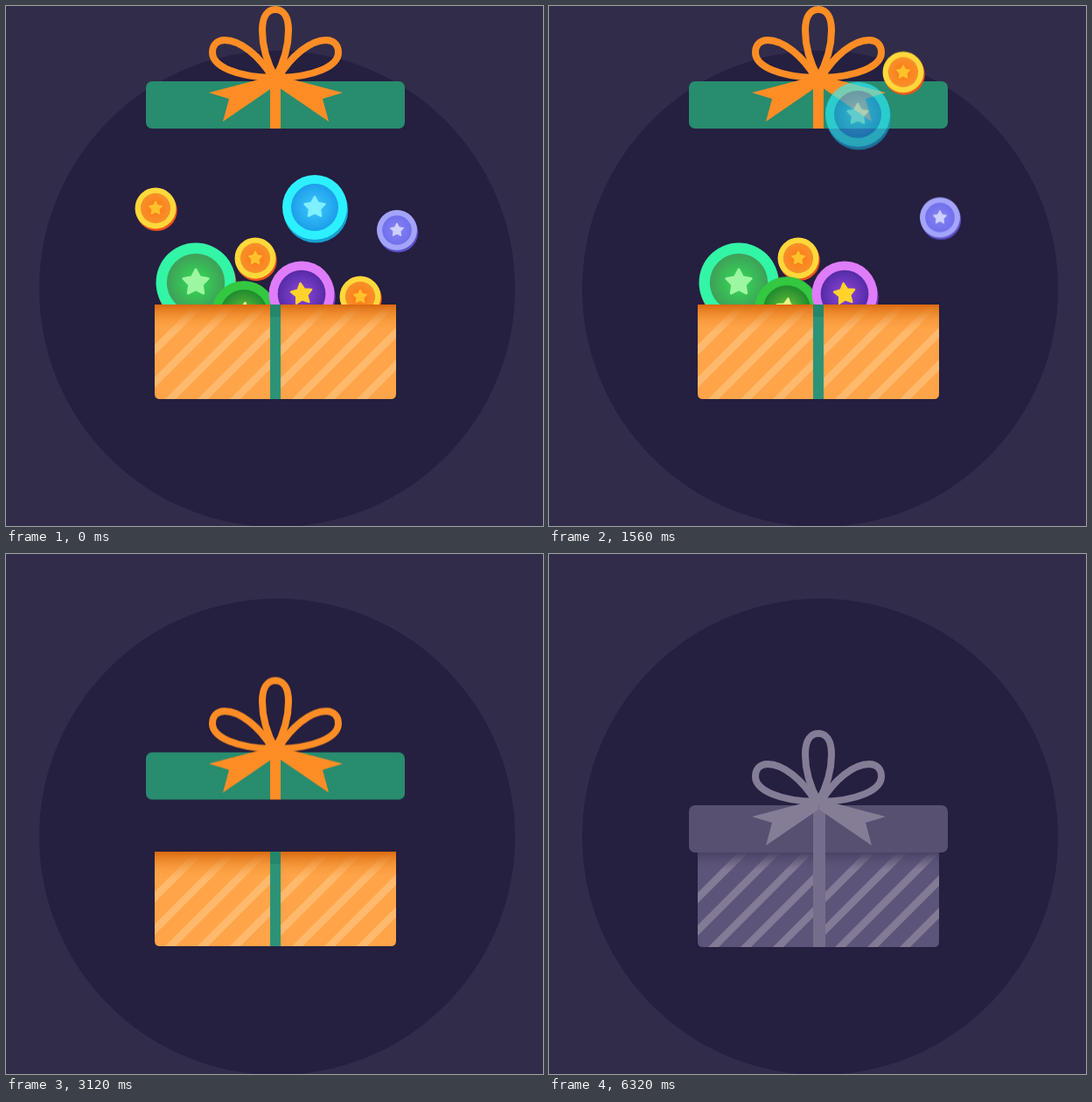
Animation of 614 by 594 pixels, one loop 9240 ms. Source, as an HTML page:

```html
<!DOCTYPE html>
<html lang="en">
<head>
<meta charset="utf-8">
<title>Gift box</title>
<style>
  html, body { margin: 0; width: 100%; height: 100%; overflow: hidden; background: #312c49; }
  svg { display: block; width: 614px; height: 594px; }
  .lid, .box, .color, .grey, .rise, .fade { animation: 9240ms linear infinite both; }
</style>
</head>
<body>
<svg viewBox="0 0 614 594">
  <defs>
    <linearGradient id="shadow" x1="0" y1="0" x2="0" y2="1">
      <stop offset="0" stop-color="#d9680f"/>
      <stop offset=".4" stop-color="#e88324" stop-opacity=".6"/>
      <stop offset="1" stop-color="#ffa448" stop-opacity="0"/>
    </linearGradient>
    <linearGradient id="greyShadow" x1="0" y1="0" x2="0" y2="1">
      <stop offset="0" stop-color="#494263"/>
      <stop offset="1" stop-color="#5d5479" stop-opacity="0"/>
    </linearGradient>
    <clipPath id="panels"><path d="M170 341H302V449H176Q170 449 170 443ZM314 341H446V443Q446 449 440 449H314Z"/></clipPath>
    <path id="body" d="M170 341H446V443Q446 449 440 449H176Q170 449 170 443Z"/>
    <g id="stripes" clip-path="url(#panels)" fill="none" stroke-width="8.5"></g>
    <g id="bow">
      <g fill="none" stroke="currentColor" stroke-width="8" stroke-linejoin="round">
        <path d="M308 82C297 62 293 44 293 28C293 12 299 4 308 4C317 4 323 12 323 28C323 44 319 62 308 82Z"/>
        <path id="loop" d="M305 82C290 57 268 39 250 39C240 39 236 46 236 53C236 69 264 81 305 82Z"/>
        <use href="#loop" transform="matrix(-1 0 0 1 616 0)"/>
      </g>
      <path id="tail" fill="currentColor" d="M308 79L232 99L255 106L248 132L308 91Z"/>
      <use href="#tail" transform="matrix(-1 0 0 1 617 0)"/>
    </g>
  </defs>

  <circle cx="310" cy="323" r="272" fill="#251f40"/>

  <g class="color">
    <g class="lid" color="#ff8d25">
      <rect x="160" y="86" width="296" height="54" rx="7" fill="#288c6e"/>
      <rect x="302" y="84" width="12" height="56" fill="currentColor"/>
      <use href="#bow"/>
    </g>
    <g id="coins"></g>
    <g class="box">
      <use href="#body" fill="#ffa448"/>
      <use href="#stripes" stroke="#ffb96d"/>
      <rect x="302" y="341" width="12" height="108" fill="#2d9376"/>
      <rect x="170" y="341" width="132" height="32" fill="url(#shadow)"/>
      <rect x="314" y="341" width="132" height="32" fill="url(#shadow)"/>
      <rect x="302" y="341" width="12" height="14" fill="#1d7a5e" opacity=".5"/>
    </g>
  </g>

  <g class="grey" color="#857d96">
    <use href="#body" fill="#5d5479"/>
    <use href="#stripes" stroke="#837a95"/>
    <rect x="170" y="341" width="276" height="20" fill="url(#greyShadow)"/>
    <rect x="160" y="287" width="296" height="54" rx="7" fill="#575070"/>
    <rect x="302" y="286" width="14" height="163" fill="#756d89"/>
    <use href="#bow" y="201"/>
  </g>
</svg>

<script>
const LOOP = 9240;
const NS = "http://www.w3.org/2000/svg";
const pct = ms => (ms / LOOP * 100).toFixed(3) + "%";
const rules = [];

function keyframes(name, from, to, start, end, ease = "linear") {
  rules.push(`@keyframes ${name} {
    0% { ${from} }
    ${pct(start)} { ${from}; animation-timing-function: ${ease} }
    ${pct(end)}, 100% { ${to} }
  }`);
}

function add(parent, tag, attrs) {
  const el = document.createElementNS(NS, tag);
  for (const key in attrs) el.setAttribute(key, attrs[key]);
  return parent.appendChild(el);
}

const shift = y => `transform: translateY(${y}px)`;
const alpha = a => `opacity: ${a}`;

function bind(selector, name) {
  rules.push(`${selector} { animation-name: ${name} }`);
}

// Diagonal stripes, the same on both panels
const stripes = document.getElementById("stripes");
for (const [left, base] of [[170, 563], [314, 708]]) {
  for (let i = 0; i < 5; i++) {
    const sum = base + i * 37;
    const x1 = Math.max(left, sum - 449), x2 = Math.min(left + 132, sum - 341);
    const a = Math.max(left - 8, x1 - 8), b = Math.min(left + 140, x2 + 8);
    add(stripes, "path", { d: `M${a} ${sum - a}L${b} ${sum - b}` });
  }
}

// ring, rim of the disc, centre of the disc, star, side
const skins = {
  gold:   ["#ffd83a", "#f6912a", "#ff7f1c", "#ffc22c", "#ee541b"],
  cyan:   ["#2df0ff", "#1c9eea", "#34bdf8", "#80f0ff", "#189fd0"],
  blue:   ["#a3a4fa", "#7170ec", "#7f7df2", "#ced0ff", "#5b50c8"],
  mint:   ["#33f5a6", "#3f9f58", "#36cc57", "#9df7a0", "#d8481f"],
  green:  ["#33c83f", "#1f8a2f", "#55b236", "#e6fb86", "#14602a"],
  purple: ["#df7cfa", "#552ba6", "#7d3fca", "#ffd32b", "#7939bd"]
};

for (const name in skins) {
  const g = add(document.querySelector("defs"), "radialGradient", { id: name });
  add(g, "stop", { offset: .3, "stop-color": skins[name][2] });
  add(g, "stop", { offset: 1, "stop-color": skins[name][1] });
}

function starPath(r, tilt) {
  const pts = [];
  for (let i = 0; i < 10; i++) {
    const a = i * Math.PI / 5 - Math.PI / 2 + tilt;
    const d = i % 2 ? r * .52 : r;
    pts.push((d * Math.cos(a)).toFixed(2) + "," + (d * Math.sin(a)).toFixed(2));
  }
  return pts.join(" ");
}

// rise and fade: start and end in ms
const coins = [
  { skin: "gold",   x: 171, y: 231, r: 23.5, up: 80,  rise: [160, 1790],  fade: [800, 1520] },
  { skin: "cyan",   x: 353, y: 230, r: 37,   up: 115, rise: [930, 1880],  fade: [1400, 1860] },
  { skin: "gold",   x: 405, y: 332, r: 23.5, up: 330, rise: [800, 2400],  fade: [1720, 2420] },
  { skin: "blue",   x: 447, y: 256, r: 23,   up: 120, rise: [1372, 3006], fade: [2000, 2840] },
  { skin: "mint",   x: 217, y: 316, r: 45.5, up: 0,   rise: [1700, 2400], fade: [1720, 2380] },
  { skin: "gold",   x: 285, y: 288, r: 23.5, up: 115, rise: [1750, 2650], fade: [2200, 2640] },
  { skin: "green",  x: 272, y: 351, r: 37,   up: 110, rise: [1500, 2500], fade: [2140, 2600], tilt: .12 },
  { skin: "purple", x: 338, y: 329, r: 37.5, up: 117, rise: [2000, 3000], fade: [2560, 2880], tilt: -.12 }
];

coins.forEach((c, i) => {
  const [ring, , , star, side] = skins[c.skin];
  const rise = add(document.getElementById("coins"), "g", { class: "rise", id: "rise" + i });
  const fade = add(rise, "g", { class: "fade", id: "fade" + i });
  const g = add(fade, "g", { transform: `translate(${c.x} ${c.y})` });
  add(g, "circle", { cx: 1.2, cy: c.r > 30 ? 3.5 : 2.5, r: c.r, fill: side });
  add(g, "circle", { r: c.r, fill: ring });
  add(g, "circle", { r: c.r * .73, fill: `url(#${c.skin})` });
  add(g, "polygon", {
    points: starPath(c.r * .33, c.tilt || 0), fill: star,
    stroke: star, "stroke-width": c.r * .06, "stroke-linejoin": "round"
  });
  keyframes("up" + i, shift(0), shift(-c.up), ...c.rise, "ease");
  keyframes("out" + i, alpha(1), alpha(0), ...c.fade);
  bind("#rise" + i, "up" + i);
  bind("#fade" + i, "out" + i);
});

keyframes("close", shift(0), shift(200), 2690, 3730, "ease");
keyframes("settle", shift(0), shift(-1), 2690, 2691);
keyframes("leave", alpha(1), alpha(0), 5490, 6320, "ease-in-out");
keyframes("enter", alpha(0), alpha(1), 5490, 6320, "ease-in-out");
bind(".lid", "close");
bind(".box", "settle");
bind(".color", "leave");
bind(".grey", "enter");

const sheet = document.createElement("style");
sheet.textContent = rules.join("\n");
document.head.append(sheet);
</script>
</body>
</html>
```
